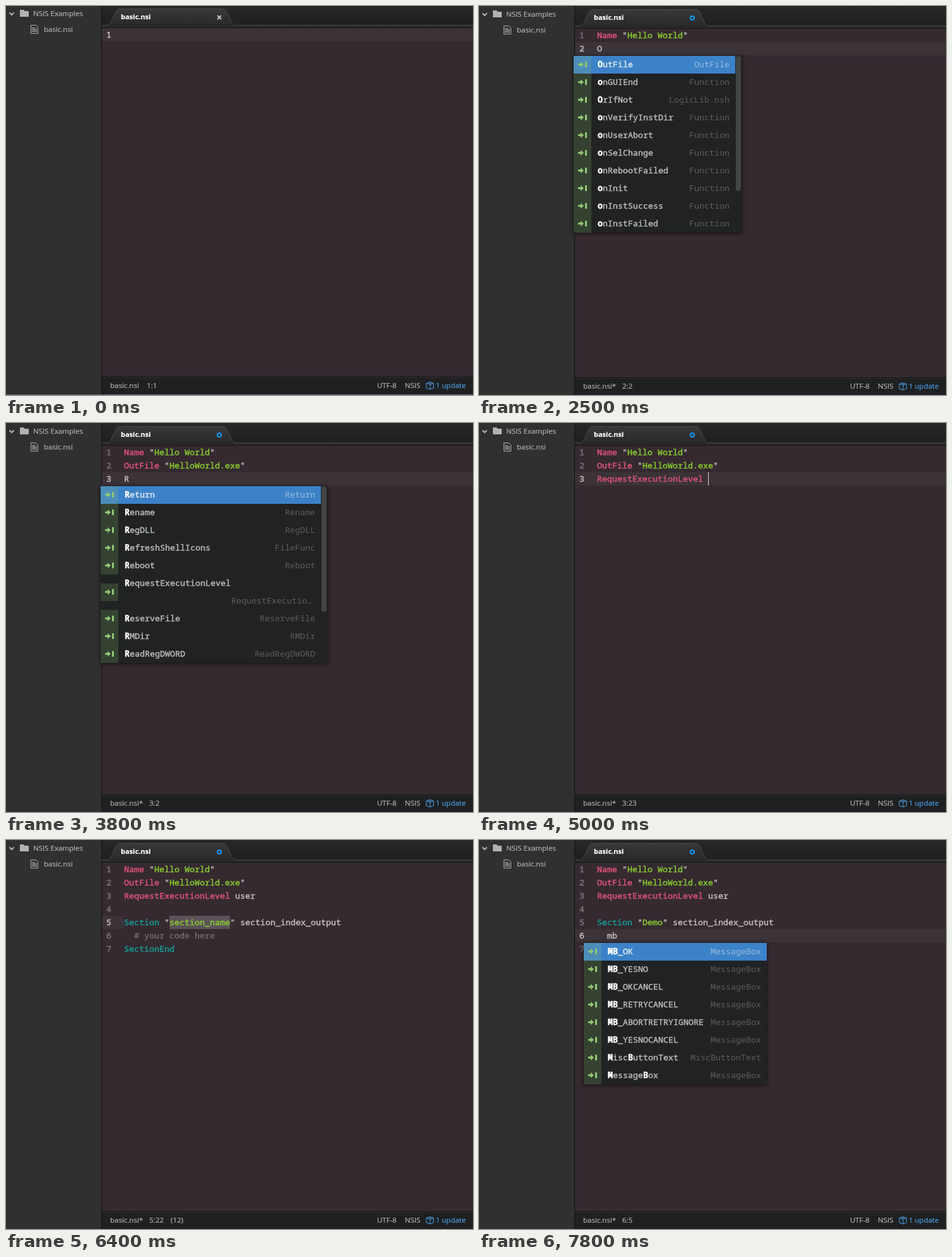
An HTML page that plays this animation: 740x616 px, repeating every 8 s.

```html
<!DOCTYPE html>
<html lang="en">
<head>
<meta charset="utf-8">
<title>Editor autocomplete</title>
<style>
  html, body { margin: 0; width: 100%; height: 100%; overflow: hidden; background: #66686a; }
  svg { display: block; }
  text { white-space: pre; font: 11.5px "Open Sans", "Noto Sans", sans-serif; color: #b4b4b4; stroke-width: .2px; }
  text, tspan { fill: currentColor; stroke: currentColor; }
  .mono { font: 13.333px "Noto Sans Mono", "Liberation Mono", monospace; color: #c0bcbe; stroke-width: .45px; }
  .label { color: #5d5e5e; stroke-width: 0; }
  .match { font-weight: 700; color: #fff; }
  .command { color: #df5379; }
  .block { color: #179b92; }
  .string { color: #88ca2f; }
  .comment { color: #7d7579; stroke-width: .2px; }
  .number { color: #7d7579; }
  .active { color: #c6c2c4; }
  .popup { filter: drop-shadow(0 1px 3px #000a); }
</style>
</head>
<body>
<svg id="stage" width="740" height="616" viewBox="0 0 740 616">
  <defs>
    <linearGradient id="bar" x2="0" y2="1"><stop stop-color="#282828"/><stop offset="1" stop-color="#1f1f1f"/></linearGradient>
    <linearGradient id="tab" x2="0" y2="1"><stop stop-color="#393939"/><stop offset="1" stop-color="#292929"/></linearGradient>
  </defs>
  <g id="window">
    <rect width="740" height="616" fill="#342a30"/>
    <rect y="-1" width="151" height="617" fill="#303030"/>
    <rect x="151" y="-1" width="1" height="617" fill="#111"/>
    <path d="M5.500 11.500l3.500 3.500 3.500-3.500" fill="none" stroke="#b2b2b2" stroke-width="2"/>
    <path d="M22 18V8q0-1 1-1h5l1.500 2H35q1 0 1 1v8z" fill="#b2b2b2"/>
    <text x="43" y="17">NSIS Examples</text>
    <path d="M39.500 31.500h8l3 3v10h-11zM41 35.500h5M41 37.500h8M41 39.500h8M41 41.500h8" fill="none" stroke="#b2b2b2"/>
    <text x="60" y="42">basic.nsi</text>

    <rect x="152" y="-1" width="588" height="33" fill="url(#bar)"/>
    <rect x="152" y="32" width="588" height="3" fill="#292929"/>
    <path d="M152 35.500h588" stroke="#151515"/>
    <path d="M152 31.500h9q3 0 4.500-3l9-19q2-4 6-4h163q4 0 6 4l9 19q1.500 3 4.500 3H740" fill="url(#tab)" stroke="#4b4b4b"/>
    <text x="182" y="22" style="font-size:11px;font-weight:700;color:#fff">basic.nsi</text>

    <rect x="152" y="589" width="588" height="27" fill="#1e2021"/>
    <path d="M152 588.500h588" stroke="#111"/>
    <path d="M152 589.500h588" stroke="#303233"/>
    <text x="588" y="606">UTF-8</text>
    <text x="632" y="606">NSIS</text>
    <path d="M666 598.500l6-2 5.500 2v7.500l-5.500 2-6-2zl6 2 5.500-2M672 600.500v7.500M669 597.500l5.500 2" fill="none" stroke="#4a9fe8"/>
    <text x="681" y="606" style="color:#4a9fe8">1 update</text>
    <g id="dynamic"></g>
  </g>
</svg>
<script>
const LOOP = 8000, CHAR = 8, LINE = 21, ROW = 28, LEFT = 187, TOP = 36;
const dynamic = document.getElementById('dynamic');
const windowGroup = document.getElementById('window');

// Suggestion lists: "name:label"; a missing label repeats the name.
const lists = {
  na: { width: 199, rows: 'Name' },
  o: { width: 256, thumb: 214, rows: 'OutFile onGUIEnd:Function OrIfNot:LogicLib.nsh onVerifyInstDir:Function onUserAbort:Function onSelChange:Function onRebootFailed:Function onInit:Function onInstSuccess:Function onInstFailed:Function' },
  r: { width: 349, thumb: 199, rows: 'Return Rename RegDLL RefreshShellIcons:FileFunc Reboot RequestExecutionLevel ReserveFile RMDir ReadRegDWORD' },
  re: { width: 349, thumb: 214, rows: 'Return Rename RegDLL RefreshShellIcons:FileFunc Reboot RequestExecutionLevel ReserveFile ReadRegDWORD ReadRegStr' },
  req: { width: 359, rows: 'RequestExecutionLevel' },
  s: { width: 352, thumb: 84, rows: 'Sections:!include SetShellVarContext Section SectionIn SectionGroup SectionIsBold:LogicLib.nsh SectionGetSize SectionGetText SectionSetText SectionSetSize' },
  m: { width: 332, thumb: 160, rows: 'MB_OK:MessageBox MB_YESNO:MessageBox MB_OKCANCEL:MessageBox MB_RETRYCANCEL:MessageBox MB_ABORTRETRYIGNORE:MessageBox MB_YESNOCANCEL:MessageBox MiscButtonText MessageBox MB_ICONSTOP:MessageBox MB_TOPMOST:MessageBox' },
  mb: { width: 290, rows: 'MB_OK:MessageBox MB_YESNO:MessageBox MB_OKCANCEL:MessageBox MB_RETRYCANCEL:MessageBox MB_ABORTRETRYIGNORE:MessageBox MB_YESNOCANCEL:MessageBox MiscButtonText MessageBox' }
};

// Timeline. "|" marks a visible caret, "¦" a hidden one.
const states = [];
const at = (time, text, list, options = {}) =>
  states.push({ time, text, popup: lists[list], ...options });

const line1 = 'Name "Hello World"\n';
const line2 = line1 + 'OutFile "HelloWorld.exe"\n';
const line3 = line2 + 'RequestExecutionLevel user\n\n';
const section = (name, body) => `${line3}Section "${name}" section_index_output\n  ${body}\nSectionEnd`;

at(0, '¦');
at(100, 'N|');
at(300, 'Na¦', 'na');
at(800, 'Name¦');
for (let i = 1; i <= 11; i++) at(1200 + i * 100, `Name "${'Hello World'.slice(0, i)}|"`);
at(2400, line1 + '|');
at(2500, line1 + 'O¦', 'o');
at(2600, line1 + 'OutFile|');
for (let i = 0; i < 10; i++)
  at(2700 + i * 100, `${line1}OutFile "${'HelloWorld.exe'.slice(0, Math.round(1 + i * 13 / 9))}|"`);
at(3700, line2 + '|');
at(3800, line2 + 'R¦', 'r');
at(3900, line2 + 'Re¦', 're');
at(4000, line2 + 'Req¦', 'req');
at(4500, line2 + 'RequestExecutionLevel¦', 'req', { shift: 38 });
for (let i = 1; i <= 5; i++) at(4900 + i * 100, line2 + 'RequestExecutionLevel' + ' user'.slice(0, i) + '|');
at(5500, line3 + 'S|', 's');
at(5600, line3 + 'Se|', 's');
for (let i = 0; i < 3; i++) at(5700 + i * 100, line3 + 'Sec|', 's', { chosen: i });
at(6400, section('section_name¦', '# your code here'), '', { selected: 12 });
at(7000, section('|', '# your code here'));
for (let i = 1; i <= 4; i++) at(7100 + i * 100, section('Demo'.slice(0, i) + '|', '# your code here'));
at(7700, section('Demo', 'm¦'), 'm');
at(7800, section('Demo', 'mb¦'), 'mb');

const rect = (x, y, w, h, fill, extra = '') =>
  `<rect x="${x}" y="${y}" width="${w}" height="${h}" fill="${fill}" ${extra}/>`;
const text = (x, y, body, cls = '', extra = '') =>
  `<text x="${x}" y="${y}" class="${cls}" ${extra}>${body}</text>`;
const span = (cls, body) => `<tspan class="${cls}">${body}</tspan>`;

function highlight(line) {
  return line.replace(/^(?:Name|OutFile|RequestExecutionLevel)(?= )|^SectionEnd|^Section(?= "[^"])|"[^"]*"|#.*/g, token => {
    if (token[0] === '"') return `"${span('string', token.slice(1, -1))}"`;
    if (token[0] === '#') return span('comment', token);
    return span(token.startsWith('Section') ? 'block' : 'command', token);
  });
}

function markMatches(name, prefix) {
  let next = 0;
  return [...name].map(c =>
    next < prefix.length && c.toLowerCase() === prefix[next].toLowerCase()
      ? (next++, span('match', c)) : c).join('');
}

function drawPopup({ width, thumb, rows }, x, top, prefix, chosen) {
  let y = top, body = '';
  rows.split(' ').forEach((row, i) => {
    const [name, label = name] = row.split(':');
    const cut = label.length > 16;
    const labelWidth = cut ? 133 : label.length * CHAR;
    const wraps = 58 + name.length * CHAR + labelWidth > width;
    const height = wraps ? 2 * ROW : ROW;
    const on = i === chosen;
    const iconY = y + (height - ROW) / 2;
    if (on) body += rect(x, y, width, height, '#3c82c8');
    body += rect(x, iconY, ROW, ROW, on ? '#4d8db9' : '#354231')
      + `<path transform="translate(${x} ${iconY})" d="M7 12h4V9l5 4.500-5 4.500v-3H7zM18 9h3v9h-3z" fill="#92c873"/>`
      + text(x + 38, y + 18, markMatches(name, prefix), 'mono', `style="color:${on ? '#dfe6ee' : '#b8b9b9'}"`)
      + text(x + width - (cut ? 14 : 9), y + height - 10, cut ? label.slice(0, 15) + '…' : label,
        'mono label', `text-anchor="end" ${on ? 'style="color:#9dbcdc"' : ''}`);
    y += height;
  });
  const scroll = thumb ? rect(x + width + 1, top, 8, thumb, '#434545', 'rx="4"') : '';
  return `<g class="popup">${rect(x, top, width + (thumb ? 10 : 0), y - top, '#202223')}${body}${scroll}</g>`;
}

function draw({ time, text: source, popup, shift = 0, chosen = 0, selected = 0 }) {
  const before = source.split(/[|¦]/)[0].split('\n');
  const row = before.length - 1, col = before[row].length;
  const lineTop = TOP + row * LINE, caretX = LEFT + col * CHAR;
  const modified = time > 0;

  let out = rect(152, lineTop, selected ? 35 : 588, LINE, '#3b3338');
  if (selected) out += rect(caretX - selected * CHAR, lineTop, selected * CHAR, LINE, '#5c5358');
  source.replace(/[|¦]/, '').split('\n').forEach((line, i) => {
    const y = TOP + i * LINE + 15;
    out += text(159, y, i + 1, 'mono ' + (i === row ? 'active' : 'number')) + text(LEFT, y, highlight(line), 'mono');
  });
  if (source.includes('|')) out += rect(caretX, lineTop, 1, LINE, '#d8d4d6');

  out += modified
    ? '<circle cx="338" cy="19" r="3" fill="none" stroke="#1598f8" stroke-width="2"/>'
    : '<path d="M335 16l6 6m0-6l-6 6" stroke="#c4c4c4" stroke-width="2"/>';
  out += text(165, 606, 'basic.nsi' + (modified ? '*' : ''))
    + text(modified ? 227 : 223, 606, `${row + 1}:${col + 1}`);
  if (selected) out += text(261, 606, `(${selected})`);

  if (popup) {
    const prefix = before[row].trim();
    out += drawPopup(popup, caretX - prefix.length * CHAR - 37 + shift, lineTop + 22, prefix, chosen);
  }
  dynamic.innerHTML = out;
  windowGroup.setAttribute('transform', `translate(0 ${modified ? 0 : -1})`);
}

let shown;
function tick() {
  const t = performance.now() % LOOP;
  const state = states.findLast(s => s.time <= t);
  if (state !== shown) draw(shown = state);
  requestAnimationFrame(tick);
}
tick();
</script>
</body>
</html>
```
